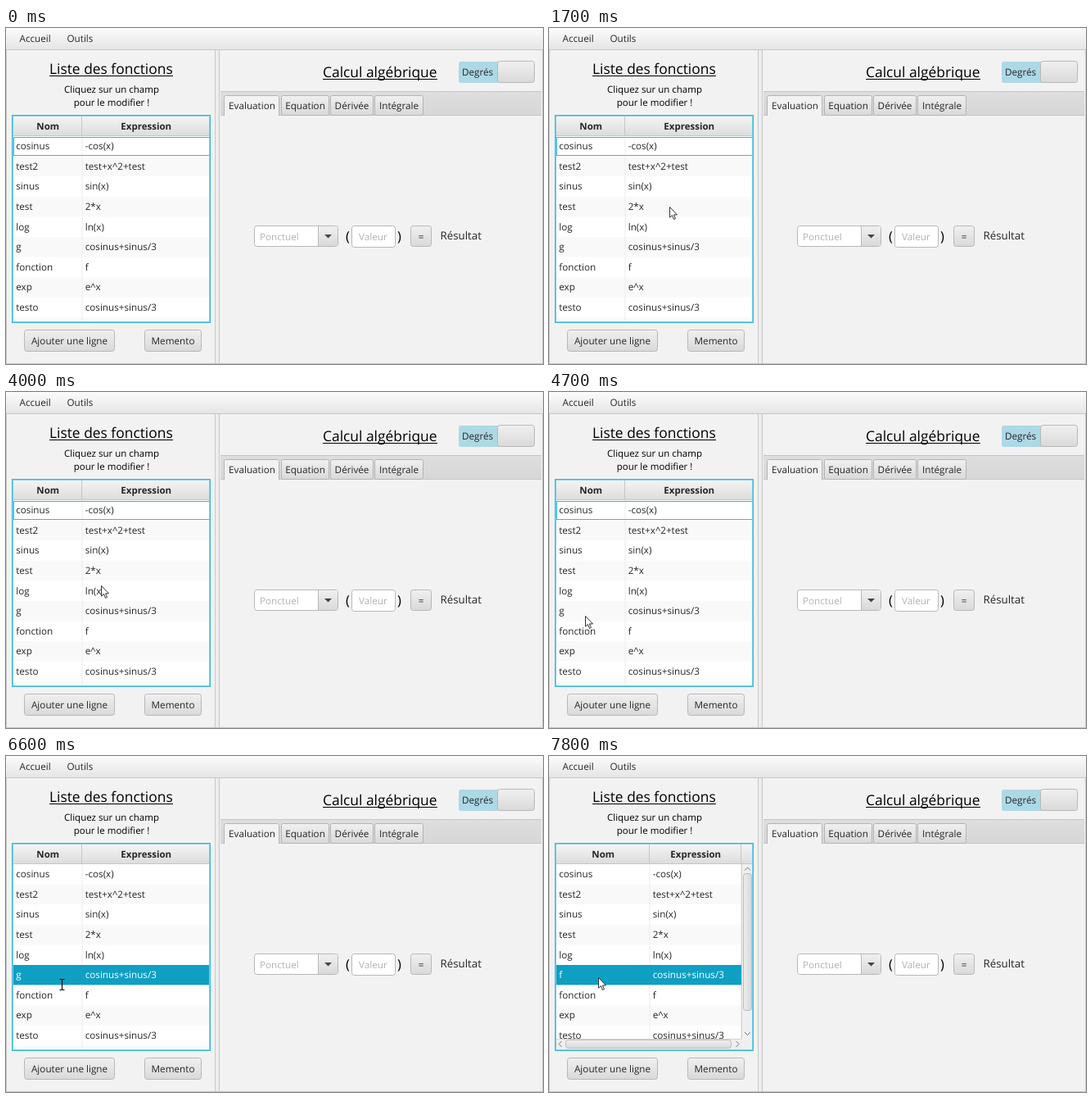
Recreate the animation shown at these times as an HTML page. Size 656 by 410 pixels, loop 8 s.

```html
<!DOCTYPE html>
<html lang="fr">
<head>
<meta charset="utf-8">
<title>Calcul algébrique</title>
<style>
html, body { margin: 0; width: 100%; height: 100%; overflow: hidden; background: #f2f2f2; }
svg { display: block; width: 656px; height: 410px; }
text { font-family: "Open Sans", "Noto Sans", sans-serif; font-size: 11.7px; fill: #262626; text-rendering: geometricPrecision; white-space: pre; }
.bold { font-weight: 700; font-size: 11.5px; text-anchor: middle; }
.title { font-size: 17.4px; fill: #000; }
.note { font-size: 11.5px; fill: #000; text-anchor: middle; }
.mid { text-anchor: middle; }
.hint { fill: #b2b2b2; }
.white { fill: #fff; }
.large { font-size: 13.3px; }
.paren { font-size: 16.5px; fill: #000; }
</style>
</head>
<body>
<svg id="stage" viewBox="0 0 656 410">
  <defs>
    <linearGradient id="menu" x2="0" y2="1"><stop stop-color="#fbfbfb"/><stop offset="1" stop-color="#e6e6e6"/></linearGradient>
    <linearGradient id="btn" x2="0" y2="1"><stop stop-color="#f0f0f0"/><stop offset="1" stop-color="#d9d9d9"/></linearGradient>
    <linearGradient id="head" x2="0" y2="1"><stop stop-color="#f4f4f4"/><stop offset="1" stop-color="#dcdcdc"/></linearGradient>
    <linearGradient id="strip" x2="0" y2="1"><stop stop-color="#dedede"/><stop offset="1" stop-color="#d7d7d7"/></linearGradient>
    <linearGradient id="thumb" x2="1" y2="0"><stop stop-color="#ededed"/><stop offset="1" stop-color="#d8d8d8"/></linearGradient>
    <clipPath id="body"><rect x="9" y="132" width="240" height="227"/></clipPath>
    <clipPath id="shortBody"><rect x="9" y="132" width="240" height="213"/></clipPath>
  </defs>
  <g id="frame"></g>
  <g id="table"></g>
  <path id="arrow" d="M0 0V12.7L3 10L5 15L7 14L5 9.4H9Z" fill="#fff" stroke="#333" stroke-width="1"/>
  <path id="beam" d="M-3 -6.5H-1L0 -5.5L1 -6.5H3M0 -5.5V5.5M-3 6.5H-1L0 5.5L1 6.5H3" fill="none" stroke="#111" stroke-width="1.2"/>
</svg>
<script>
const $ = id => document.getElementById(id);
const BLUE = '#0f9fc3', RING = '#34b9d9', GLOW = '#7fd0e6', EDGE = '#b8b8b8';

const box = (x, y, w, h, fill, stroke = 'none', r = 0, sw = 1) =>
  `<rect x="${x}" y="${y}" width="${w}" height="${h}" rx="${r}" fill="${fill}" stroke="${stroke}" stroke-width="${sw}"/>`;
const text = (x, y, s, cls = '') => `<text x="${x}" y="${y}" class="${cls}">${s}</text>`;
const shape = (d, fill) => `<path d="${d}" fill="${fill}"/>`;
const line = (d, color) => `<path d="${d}" fill="none" stroke="${color}"/>`;
const button = (x, y, w, h, s) =>
  box(x + .5, y + .5, w - 1, h - 1, 'url(#btn)', EDGE, 3) + text(x + w / 2, y + 17.5, s, 'mid');

function drawFrame() {
  const tabs = [['Equation', 336, 59], ['Dérivée', 396, 53], ['Intégrale', 450, 60]];
  return box(0, 0, 656, 410, '#f2f2f2') +
    box(0, 0, 656, 26, 'url(#menu)') +
    text(16.5, 17, 'Accueil') + text(74.5, 17, 'Outils') +
    line('M0 26.5H656M.5 27V409.5H655.5V27', '#c6c6c6') +
    box(255, 27, 6, 382, '#ededed') +
    line('M255.5 27V409M260.5 27V409', '#c9c9c9') +
    text(53, 56, 'Liste des fonctions', 'title') + box(53, 58, 151, 1, '#000') +
    text(129, 79.3, 'Cliquez sur un champ', 'note') + text(129, 95.3, 'pour le modifier !', 'note') +
    button(22, 368, 111, 27, 'Ajouter une ligne') + button(169, 368, 70, 27, 'Memento') +
    text(387, 60, 'Calcul algébrique', 'title') + box(387, 62, 140, 1, '#000') +
    box(553, 41, 60, 26, '#add8e6', 'none', 3) + text(557, 58, 'Degrés') +
    box(600.5, 40.5, 45, 26, 'url(#btn)', EDGE, 3) +
    box(262, 77, 392, 30, 'url(#strip)') + line('M262 77.5H654M262 106.5H654', '#c6c6c6') +
    tabs.map(([s, x, w]) =>
      box(x + .5, 82.5, w - 1, 24, 'url(#btn)', '#b4b4b4', 2) + text(x + w / 2, 99, s, 'mid')).join('') +
    shape('M266.5 107.5V84Q266.5 82 268.5 82H332Q334 82 334 84V107.5Z', '#f2f2f2') +
    line('M266.5 107V84.5Q266.5 82.5 268.5 82.5H331.5Q333.5 82.5 333.5 84.5V107', '#b4b4b4') +
    text(300.5, 99, 'Evaluation', 'mid') +
    box(303.5, 241.5, 102, 25, '#fff', EDGE, 3) +
    shape('M382 242H403Q405 242 405 244V264Q405 266 403 266H382Z', 'url(#btn)') +
    line('M381.5 242V266', EDGE) + shape('M389 252H398L393.5 256.5Z', '#444') +
    text(310, 258.5, 'Ponctuel', 'hint') +
    text(415, 259.5, '(', 'paren') + text(478, 259.5, ')', 'paren') +
    box(422.5, 241.5, 53, 26, '#fff', EDGE, 3) + text(431, 258.5, 'Valeur', 'hint') +
    button(494, 241, 26, 26, '=') + text(530.5, 258, 'Résultat', 'large');
}

const ROWS = [['cosinus', '-cos(x)'], ['test2', 'test+x^2+test'], ['sinus', 'sin(x)'],
  ['test', '2*x'], ['log', 'ln(x)'], ['g', 'cosinus+sinus/3'], ['fonction', 'f'],
  ['exp', 'e^x'], ['testo', 'cosinus+sinus/3'], ['', '']];
const ROW_H = 24.6;

function rowsOf({ col, right, edit, picked, name }) {
  let y = 132, out = '';
  ROWS.forEach(([label, expr], i) => {
    const active = i === 5 && (picked || edit);
    const h = i === 5 && edit ? 32 : ROW_H;
    const base = y + 16.2;
    const fill = active ? (edit ? '#d0d0d0' : BLUE) : i % 2 ? '#f9f9f9' : '#fff';
    const cls = active && picked ? 'white' : '';
    out += box(9, y, right - 9, h, fill);
    if (!active) out += line(`M${col + .5} ${y}v${h}M${right - .5} ${y}v${h}`, '#ececec');
    if (i === 5 && edit) {
      out += box(13, 259, 102, 25, '#fff', RING, 3, 2);
      out += name === 'g' ? box(19, 263, 9, 17, BLUE) + text(20, 275.5, 'g', 'white')
        : text(20, 275.5, name) + box(24, 264, 1, 15, '#333');
    } else {
      out += text(12.2, base, i === 5 ? name : label, cls);
    }
    out += text(col + 4.2, base + (i === 5 && edit ? .8 : 0), expr, cls);
    y += h;
  });
  return out;
}

function bars({ edit }) {
  const end = edit ? 358 : 345;
  let out = box(235, 132, 14, end - 132, '#efefef') + line(`M235.5 132V${end}`, '#d4d4d4') +
    box(237.5, 143.5, 10, edit ? 179 : 167, 'url(#thumb)', '#bcbcbc', 3) +
    line(`M239 139.5L242.5 136L246 139.5M239 ${end - 8}l3.5 3.5l3.5 -3.5`, '#777');
  if (!edit) out += box(9, 345, 240, 13, '#efefef') + line('M9 345.5H235', '#d4d4d4') +
    box(20.5, 346.5, 202, 10, 'url(#btn)', '#bcbcbc', 3) +
    line('M15.5 348L12 351.5L15.5 355M228.5 348L232 351.5L228.5 355', '#777');
  return out;
}

function drawTable(s) {
  const { col, headCol = col, headRight, wide, edit } = s;
  return box(8, 107, 242, 252, '#fff') +
    box(9, 108, 240, 24, 'url(#head)') +
    line(`M9 131.5H249M${headCol} 108V132M${headRight - .5} 108V132`, '#c6c6c6') +
    text((9 + headCol) / 2 + .5, 124, 'Nom', 'bold') +
    text((headCol + headRight) / 2 + .5, 124, 'Expression', 'bold') +
    `<g clip-path="url(#${wide && !edit ? 'shortBody' : 'body'})">${rowsOf(s)}</g>` +
    (wide ? bars(s) : '') +
    (s.focus ? box(9.5, 133.5, 239, 22, 'none', RING) : '') +
    (edit ? box(8.5, 107.5, 241, 251, 'none', '#c6c6c6')
      : box(7.5, 106.5, 242, 253, 'none', RING) + box(8.5, 107.5, 240, 251, 'none', GLOW));
}

const narrow = { col: 92.5, headRight: 249, right: 249, name: 'g' };
const editing = { col: 118, headCol: 92.5, headRight: 249, right: 235, wide: true, edit: true };
const STATES = [
  [0, { ...narrow, focus: true }],
  [6300, { ...narrow, picked: true }],
  [6700, { ...editing, name: 'g' }],
  [7500, { ...editing, name: 'f' }],
  [7600, { col: 122.5, headRight: 235, right: 235, wide: true, picked: true, name: 'f' }]
];

// time, x, y of the pointer tip
const PATH = [[500, 236, 310], [900, 196, 262], [1300, 164, 232], [1700, 147, 218], [2200, 152, 196],
  [2900, 170, 188], [3200, 173, 183], [3700, 152, 214], [4200, 92, 250], [4700, 44, 273],
  [5100, 58, 288], [5600, 82, 281], [6000, 60, 270]];

function tipAt(t) {
  const k = PATH.findIndex(p => p[0] > t);
  if (k < 0) return PATH.at(-1).slice(1);
  const [t0, x0, y0] = PATH[k - 1], [t1, x1, y1] = PATH[k];
  const f = (t - t0) / (t1 - t0);
  return [x0 + (x1 - x0) * f, y0 + (y1 - y0) * f];
}

$('frame').innerHTML = drawFrame();
$('table').innerHTML = STATES.map(([, s]) => `<g>${drawTable(s)}</g>`).join('');
$('beam').setAttribute('transform', 'translate(68.5 279)');
const views = [...$('table').children];
const show = (el, on) => { el.style.display = on ? '' : 'none'; };

function render(now) {
  const t = Math.floor(now % 8000 / 100) * 100;
  const current = STATES.filter(([start]) => start <= t).length - 1;
  views.forEach((v, i) => show(v, i === current));
  const beam = t >= 6600 && t < 7600;
  show($('beam'), beam);
  show($('arrow'), t >= 500 && !beam);
  if (t >= 500) {
    const [x, y] = tipAt(t).map(Math.round);
    $('arrow').setAttribute('transform', `translate(${x + .5} ${y + .5})`);
  }
}

const start = performance.now();
function tick() {
  render(performance.now() - start);
  requestAnimationFrame(tick);
}
tick();
</script>
</body>
</html>
```
